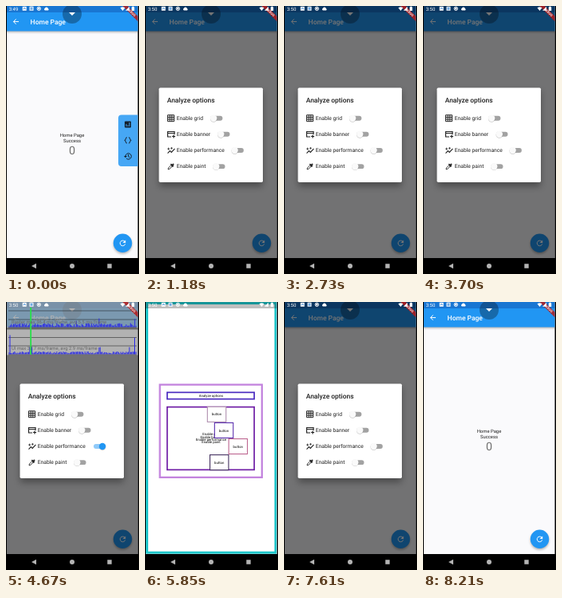
These frames come from a looping animation (167 px wide and 336 px high, 8.24 s). An HTML page:

```html
<!DOCTYPE html>
<html lang="en">
<head>
<meta charset="utf-8">
<style>
html, body { margin: 0; width: 100%; height: 100%; overflow: hidden; background: #000; }
svg { display: block; width: 167px; height: 336px; }
text { font-family: Roboto, sans-serif; text-rendering: geometricPrecision; }
.mid { text-anchor: middle; }
.line { fill: none; stroke-width: 1; }
</style>
</head>
<body>
<svg viewBox="0 0 167 336">
  <defs>
    <clipPath id="screen"><rect x="1" width="164.5" height="316"/></clipPath>
    <filter id="soft" x="-30%" y="-30%" width="160%" height="160%"><feGaussianBlur stdDeviation="1.6"/></filter>
    <filter id="wide" x="-30%" y="-30%" width="160%" height="160%"><feGaussianBlur stdDeviation="4.5"/></filter>
    <pattern id="mesh" x="1" width="3.36" height="3.36" patternUnits="userSpaceOnUse">
      <path d="M0 .2H3.36M.2 0V3.36" stroke="#f9bbe0" stroke-opacity=".88" stroke-width=".42"/>
      <path d="M0 1.7H3.36M1.7 0V3.36" stroke="#f9bbe0" stroke-opacity=".88" stroke-width=".1"/>
    </pattern>
  </defs>

  <g clip-path="url(#screen)">
    <!-- home page -->
    <rect width="167" height="316" fill="#fafafc"/>
    <rect y="9" width="167" height="23.5" opacity=".35" filter="url(#soft)"/>
    <rect y="8" width="167" height="23.5" fill="#2196f3"/>
    <rect width="167" height="8" fill="#1976d2"/>
    <path class="line" d="M16 19.6H9.4M12.6 16.4 9.4 19.6l3.2 3.2" stroke="#fff"/>
    <text x="30.6" y="22.7" font-size="8.5" font-weight="500" fill="#fff">Home Page</text>
    <g class="mid" font-size="5.9" fill="#222">
      <text x="83" y="164">Home Page</text>
      <text x="83" y="171">Success</text>
      <text x="83" y="186" font-size="14.3" fill="#707070">0</text>
    </g>
    <circle cx="146.5" cy="299" r="11.6" opacity=".3" filter="url(#soft)"/>
    <circle cx="146.5" cy="297.3" r="11.7" fill="#2196f3"/>
    <path class="line" d="M149 295.2A3.3 3.3 0 1 0 149.7 298.3" stroke="#fff"/>
    <path d="M150.2 293.4v3.7h-3.7z" fill="#fff"/>
    <circle cx="83" cy="10" r="12" opacity=".3"/>
    <path d="M79 8h8l-4 4z" fill="#fff"/>

    <!-- side panel -->
    <g id="panel">
      <rect x="141" y="136.5" width="28" height="64.5" rx="4" fill="#46a7f5"/>
      <rect x="149" y="144.5" width="8" height="8" rx="1" fill="#14202c"/>
      <path class="line" d="M151 151v-3M153 151v-1.6M155 151v-5" stroke="#46a7f5" stroke-width=".8"/>
      <path class="line" d="M152 164.8q-1.7 0-1.7 1.7 0 1.9-1.5 1.9 1.5 0 1.5 1.9 0 1.7 1.7 1.7M154 164.8q1.7 0 1.7 1.7 0 1.9 1.5 1.9-1.5 0-1.5 1.9 0 1.7-1.7 1.7" stroke="#14202c"/>
      <path class="line" d="M150 188.5a3.7 3.7 0 1 1 1.2 2.7M153.6 186v2.7l1.9 1.2" stroke="#14202c" stroke-width=".9"/>
      <path d="M148 188h4l-2 2.2z" fill="#14202c"/>
    </g>

    <!-- options dialog -->
    <g id="dialog">
      <rect width="167" height="316" opacity=".54"/>
      <rect x="18" y="107" width="129.5" height="119" opacity=".35" filter="url(#wide)"/>
      <rect x="17.5" y="102.5" width="130.5" height="118.5" rx="1.7" fill="#fff"/>
      <text x="27.8" y="120.8" font-size="8.4" font-weight="500" fill="#1c1c1c">Analyze options</text>
      <g class="line" stroke="#202020">
        <path d="M28.5 136.7h8v8h-8zM31.2 136.7v8M33.8 136.7v8M28.5 139.4h8M28.5 142h8"/>
        <path d="M33 164h-4.5v-6.5h8.5v3.5M28.5 159.5h8.5M36 161.5v4M34 163.5h4" stroke-width="1.2"/>
        <path d="M28.5 184.6l2.8-3 1.9 1.8 4.2-4.6" stroke-width="1.1"/>
        <path d="M29.6 177.6v3M28.1 179.1h3M33.4 177v2.6M32.1 178.3h2.6" stroke-width=".8"/>
        <path d="M29 204.8l.4-1.8 3.5-3.5 1.4 1.4-3.5 3.5z" stroke-width=".9"/>
        <path d="M32.3 198.2l3.2 3.2M34 200l2-2" stroke-width="1.8"/>
      </g>
      <g id="rows"></g>
    </g>

    <rect id="grid" width="167" height="316" fill="url(#mesh)"/>

    <!-- frame timing charts -->
    <g id="perf">
      <path d="M1 0h165v32.5h-165zM1 34.5h165v32h-165z" fill="#fff" opacity=".45"/>
      <path class="line" d="M3 11H164M3 22H164M3 32H164M3 44.5H164M3 55H164M3 66H164" stroke="#000" stroke-opacity=".45" stroke-width=".5"/>
      <path id="bars" class="line" stroke="#2a2ae6"/>
      <path id="mark" d="M-.8 7h1.8v59h-1.8z" fill="#28e04a"/>
      <g font-size="5.9" fill="#666">
        <text x="7" y="26.5">Raster max 36.4 ms/frame, avg 5.5 ms/frame</text>
        <text x="7" y="60">UI max 37.7 ms/frame, avg 2.9 ms/frame</text>
      </g>
    </g>

    <g transform="translate(165.5 0) rotate(45)">
      <path d="M-14 9h28v4.6h-28z" fill="#b71c1c" opacity=".85"/>
      <text class="mid" y="12.7" font-size="4" font-weight="900" fill="#fff" opacity=".8">DEBUG</text>
    </g>

    <!-- semantics view -->
    <g id="paint">
      <rect width="167" height="316" fill="#fff"/>
      <rect x="2.5" y="1.5" width="161.5" height="312.7" fill="none" stroke="#1fc6ca" stroke-width="3"/>
      <rect width="167" height="8" opacity=".25"/>
      <g id="boxes"></g>
    </g>

    <!-- status bar -->
    <g fill="#fff">
      <text id="clock" x="3.8" y="5.6" font-size="6"></text>
      <path d="M20.7 .8h5v5h-5zM29.5 .8h5v5h-5z"/>
      <path class="line" d="M22 3.9l1.3-1.5 1.3 1.5M30.5 2.5h3M30.5 4.2h3" stroke="#1976d2" stroke-width=".6"/>
      <circle class="line" cx="41.3" cy="3.3" r="2.2" stroke="#fff"/>
      <circle cx="41.3" cy="3.3" r="1.2"/>
      <path d="M49 5.5a1.4 1.4 0 0 1 0-2.7 2 2 0 0 1 3.8.4 1.2 1.2 0 0 1 0 2.3z"/>
      <path d="M143.5 2.2q3-2 6 0l-3 3.8z"/>
      <path d="M155 .8v5h-5z"/>
      <path d="M157.8 1.2h1v-.6h1.4v.6h1V6h-3.4z"/>
    </g>
  </g>

  <!-- navigation bar -->
  <g fill="#b4b4b4">
    <path d="M38 322.8v6.4l-6-3.2z"/>
    <circle cx="83" cy="326" r="3"/>
    <path d="M127.3 323.3h5.4v5.4h-5.4z"/>
  </g>
</svg>
<script>
const LOOP = 8240;
const $ = id => document.getElementById(id);
const clamp = v => Math.min(1, Math.max(0, v));
const ease = v => 1 - (1 - clamp(v)) ** 3;
const pulse = (t, on, off, ms) => ease((t - on) / ms) - ease((t - off) / ms);
const show = (id, on) => $(id).setAttribute('visibility', on ? 'visible' : 'hidden');

// label, baseline, thumb x when off, times on and off
const options = [
  ['grid', 143, 86.2, 1540, 2400],
  ['banner', 163, 95.3, 3000, 3600],
  ['performance', 183.2, 112.7, 4120, 5120],
  ['paint', 203.4, 89.3, 5720, 6760]
];

$('rows').innerHTML = options.map(([name, y, x]) => `
  <text x="39.8" y="${y}" font-size="6.7" fill="#222">Enable ${name}</text>
  <rect class="track" x="${x - 2.7}" y="${y - 5.2}" width="13.9" height="5.9" rx="2.95"/>
  <g class="thumb">
    <circle cx="${x}" cy="${y - 1.6}" r="4.3" fill="#000" opacity=".2"/>
    <circle cx="${x}" cy="${y - 2.2}" r="4.2"/>
  </g>`).join('');
const tracks = document.querySelectorAll('.track');
const thumbs = document.querySelectorAll('.thumb');

const frame = (x, y, w, h, color, sw) =>
  `<rect x="${x + sw / 2}" y="${y + sw / 2}" width="${w - sw}" height="${h - sw}" fill="#fff" stroke="${color}" stroke-width="${sw}"/>`;
const label = (x, y, s) => `<text class="mid" x="${x}" y="${y}" font-size="4.3">${s}</text>`;
const buttons = [[77.8, '#b08fae'], [86.8, '#5a2fae'], [104.6, '#bd6690'], [81, '#43305f']];
$('boxes').innerHTML =
  frame(17.5, 102.5, 130.5, 118.5, '#c384de', 2.3) +
  frame(27, 112.5, 111, 10, '#4a2cc0', 1.7) + label(83, 118.9, 'Analyze options') +
  frame(27, 130.8, 111, 80.4, '#701fa6', 1.7) +
  options.map(([name], i) => label(83, 167.2 + i * 3.36, 'Enable ' + name)).join('') +
  buttons.map(([x, c], i) => frame(x, 130.8 + i * 20.1, 24.5, 20.1, c, 1.1) + label(x + 12.2, 142.4 + i * 20.1, 'button')).join('');

// seeded frame timings
let seed = 7;
const rnd = () => (seed = seed * 16807 % 2147483647) / 2147483647;
let bars = 'M5 65.5v-24M161.5 65.5v-21';
for (const [base, tall] of [[31.5, 4], [65.5, 2.5]]) {
  for (let x = 4; x < 164; x += 1.36) {
    const h = 1 + rnd() * tall + (rnd() > .96 ? 6 : 0);
    bars += `M${x.toFixed(2)} ${base}v${-h.toFixed(1)}`;
  }
}
$('bars').setAttribute('d', bars);

const start = performance.now();
function draw() {
  const t = (performance.now() - start) % LOOP;
  $('clock').textContent = t < 240 ? '3:49' : '3:50';
  show('panel', t < 280);
  $('panel').setAttribute('transform', `translate(${26 * clamp((t - 20) / 250) ** 2} 0)`);
  $('dialog').setAttribute('opacity', pulse(t, 580, 7620, 160));
  options.forEach(([, , , on, off], i) => {
    const p = pulse(t, on, off, 170), lit = p > .5;
    thumbs[i].setAttribute('transform', `translate(${8.4 * p} 0)`);
    thumbs[i].setAttribute('fill', lit ? '#2196f3' : '#fafafa');
    tracks[i].setAttribute('fill', lit ? '#90caf9' : '#a2a2a2');
  });
  for (const [id, i] of [['grid', 0], ['perf', 2], ['paint', 3]])
    show(id, t >= options[i][3] + 60 && t < options[i][4] + 60);
  $('mark').setAttribute('transform', `translate(${31 + (t - 4670) * .02} 0)`);
  requestAnimationFrame(draw);
}
draw();
</script>
</body>
</html>
```
